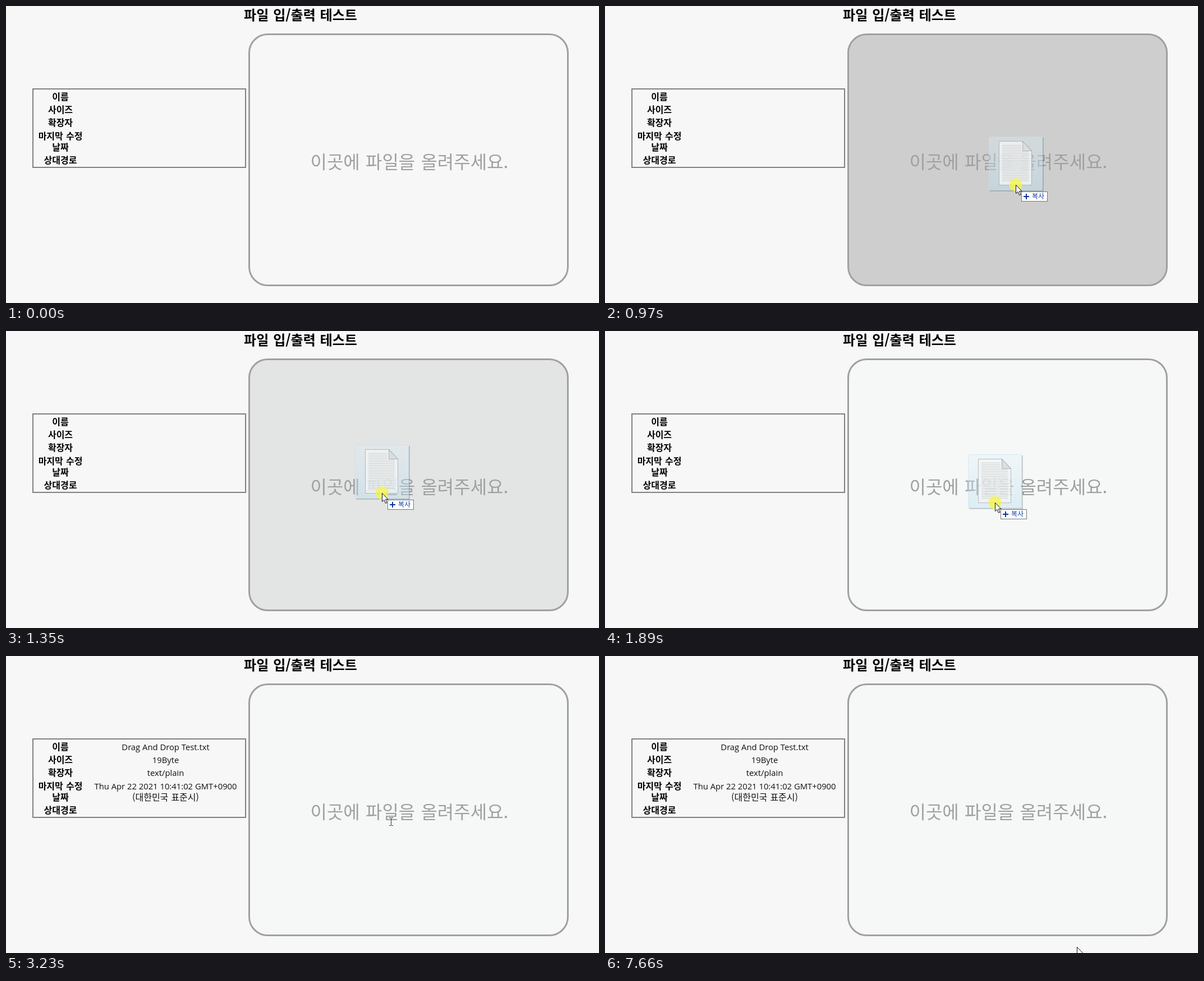
These frames come from a looping animation (1057x530 px, 8000 ms). An HTML page with a canvas:

```html
<!DOCTYPE html>
<html lang="ko">
<head>
<meta charset="utf-8">
<title>파일 입/출력 테스트</title>
<style>
html, body { margin: 0; width: 100%; height: 100%; overflow: hidden; background: #f7f7f7; }
canvas { display: block; }
</style>
</head>
<body>
<canvas id="stage" width="1057" height="530"></canvas>
<script>
const ctx = document.getElementById('stage').getContext('2d');
const LOOP = 8000, STEP = 77.8;
const GRAB = 500, DROP = 2440, LEAVE_TEXT = 4070;
const KR = '"Noto Sans CJK KR", "Noto Sans CJK", "Noto Sans CJK JP", sans-serif';
const LATIN = '"Open Sans", "Noto Sans", sans-serif';

// Each glide carries the pointer on from where the last one ended.
const glide = (from, to, x, y, power = 1) => ({ from, to, x, y, power });
const GLIDES = [
  glide(500, 967, 732, 319),
  glide(967, 1590, 633, 271),
  glide(1660, 2210, 709, 313, 3),
  glide(2430, 2440, 686, 294),
  glide(3200, 3220, 686, 295),
  glide(4005, 4150, 750, 332),
  glide(4550, 4930, 779, 356),
  glide(5500, 6350, 777, 351),
  glide(6420, 6645, 841, 370),
  glide(6650, 6720, 895, 532),
  glide(7440, 7655, 841, 519)
];

const mix = (a, b, p) => a + (b - a) * p;
const progress = (t, from, to) => Math.min(1, Math.max(0, (t - from) / (to - from)));
const easeOut = (p, power) => 1 - Math.pow(1 - p, power);

function pointer(t) {
  let x = 1030, y = 428;
  for (const g of GLIDES) {
    const p = easeOut(progress(t, g.from, g.to), g.power);
    x = mix(x, g.x, p);
    y = mix(y, g.y, p);
  }
  return [Math.round(x), Math.round(y)];
}

function text(str, x, y, size, color, opt = {}) {
  ctx.font = `${opt.weight || 400} ${size}px ${opt.family || KR}`;
  ctx.wordSpacing = (opt.space || 0) + 'px';
  ctx.textAlign = opt.align || 'center';
  ctx.fillStyle = color;
  ctx.fillText(str, x, y);
}

function shape(points, fill, stroke) {
  ctx.beginPath();
  points.forEach(([x, y]) => ctx.lineTo(x, y));
  ctx.closePath();
  ctx.fillStyle = fill;
  ctx.fill();
  ctx.strokeStyle = stroke;
  ctx.lineWidth = 1;
  ctx.stroke();
}

// Darkens while the file hovers, then clears again.
function panelColor(t) {
  const hover = easeOut(progress(t, 560, 960), 2);
  const clear = easeOut(progress(t, 1235, 1655), 2.2);
  const rest = t < 1200 ? [247, 247, 247] : [246, 248, 247];
  return `rgb(${rest.map(v => Math.round(mix(v, 206, hover * (1 - clear))))})`;
}

function panel(t) {
  ctx.beginPath();
  ctx.roundRect(433.5, 50.5, 568, 448, 33);
  ctx.fillStyle = panelColor(t);
  ctx.fill();
  ctx.strokeStyle = '#a0a0a0';
  ctx.lineWidth = 3;
  ctx.stroke();
  text('이곳에 파일을 올려주세요.', 719, 290, 32, '#a0a0a0', { weight: 350, space: 3 });
}

function table(filled) {
  ctx.strokeStyle = '#808080';
  ctx.lineWidth = 2;
  ctx.strokeRect(48, 148, 379, 140);
  const labels = ['이름', '사이즈', '확장자', '마지막 수정', '날짜', '상대경로'];
  const values = ['Drag And Drop Test.txt', '19Byte', 'text/plain',
    'Thu Apr 22 2021 10:41:02 GMT+0900', '(대한민국 표준시)'];
  // The date cell wraps, so its second line sits closer.
  const baseline = i => Math.floor(168.4 + 23.2 * i - (i > 3 ? 2.8 : 0));
  labels.forEach((s, i) => text(s, 97, baseline(i), 16, '#000', { weight: 700, space: 1.5 }));
  if (!filled) return;
  values.forEach((s, i) => i < 4
    ? text(s, 284.5, baseline(i), 14.8, '#111', { family: LATIN })
    : text(s, 284.5, baseline(i), 16, '#111', { weight: 350, space: 1.5 }));
}

function fileIcon(x, y) {
  ctx.save();
  ctx.translate(x, y);
  ctx.fillStyle = 'rgba(0,0,0,.14)';
  for (const d of [1, 2]) {
    ctx.fillRect(96, 2, d, 94 + d);
    ctx.fillRect(2, 96, 94, d);
  }
  const tint = ctx.createLinearGradient(0, 0, 0, 96);
  tint.addColorStop(0, 'rgba(222,240,248,.32)');
  tint.addColorStop(1, 'rgba(185,222,240,.42)');
  ctx.beginPath();
  ctx.roundRect(0.5, 0.5, 95.5, 95.5, 2);
  ctx.fillStyle = tint;
  ctx.fill();
  ctx.strokeStyle = 'rgba(190,224,240,.5)';
  ctx.lineWidth = 1;
  ctx.stroke();

  shape([[18.5, 8.5], [60.5, 8.5], [76.5, 25.5], [76.5, 86.5], [18.5, 86.5]],
    'rgba(244,245,245,.78)', 'rgba(130,135,138,.5)');
  ctx.fillStyle = 'rgba(150,154,156,.38)';
  for (let line = 15; line < 80; line += 3) ctx.fillRect(24, line, line < 27 ? 34 : 47, 1);
  shape([[60.5, 8.5], [76.5, 25.5], [60.5, 25.5]], 'rgba(214,217,218,.85)', 'rgba(135,140,143,.6)');
  ctx.restore();
}

function arrow(x, y) {
  const outline = [[0, 0], [0, 15], [3.5, 12], [6, 18], [8.5, 17], [6, 11], [10.5, 11]];
  shape(outline.map(([a, b]) => [x + a + 0.5, y + b + 0.5]), '#fff', '#111');
}

function beam(x, y) {
  ctx.fillStyle = '#333';
  ctx.fillRect(x, y - 6, 1, 13);
  for (const end of [y - 7, y + 7]) {
    ctx.fillRect(x - 3, end, 3, 1);
    ctx.fillRect(x + 1, end, 3, 1);
  }
}

function copyTip(x, y) {
  ctx.fillStyle = '#fff';
  ctx.fillRect(x, y, 47, 18);
  ctx.strokeStyle = '#767676';
  ctx.lineWidth = 1;
  ctx.strokeRect(x + 0.5, y + 0.5, 46, 17);
  ctx.fillStyle = '#0a2f9c';
  ctx.fillRect(x + 4, y + 8, 10, 2);
  ctx.fillRect(x + 8, y + 4, 2, 10);
  text('복사', x + 19, y + 13, 12, '#1440a8', { align: 'left' });
}

function draggedFile(x, y) {
  fileIcon(x - 48, y - 86);
  ctx.beginPath();
  ctx.arc(x, y, 11.5, 0, Math.PI * 2);
  ctx.fillStyle = 'rgba(245,245,70,.75)';
  ctx.fill();
  copyTip(x + 10, y + 12);
  arrow(x, y);
}

function draw(time) {
  // The screen refreshes in even ticks.
  const t = GRAB + Math.floor((time - GRAB + 15) / STEP) * STEP;
  const [x, y] = pointer(t);
  ctx.fillStyle = '#f7f7f7';
  ctx.fillRect(0, 0, 1057, 530);
  text('파일 입/출력 테스트', 525, 25, 24, '#000', { weight: 700, space: 2.5 });
  table(t >= DROP);
  panel(t);
  if (t < GRAB) return;
  if (t < DROP) draggedFile(x, y);
  else if (t < LEAVE_TEXT) beam(x, y);
  else arrow(x, y);
}

const start = performance.now();
function frame() {
  draw((performance.now() - start) % LOOP);
  requestAnimationFrame(frame);
}
frame();
</script>
</body>
</html>
```
